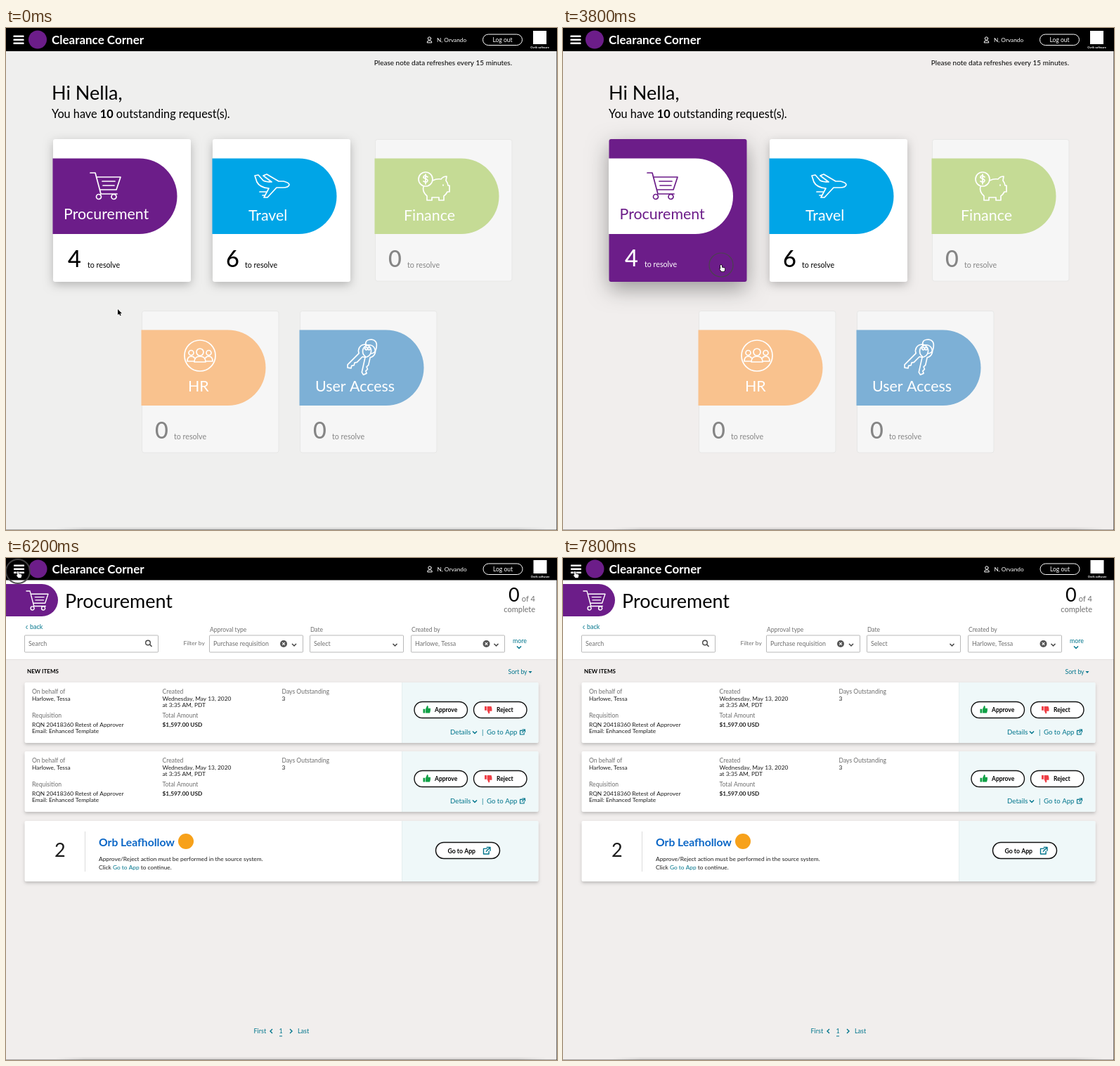
These frames come from a looping animation (784 px wide and 714 px high, 8000 ms). An HTML page with a canvas:

```html
<!DOCTYPE html>
<html lang="en">
<head>
<meta charset="utf-8">
<title>Approvals demo</title>
<style>
html, body { margin: 0; width: 100%; height: 100%; overflow: hidden; background: #f1eeed; }
canvas { display: block; width: 784px; height: 714px; }
</style>
</head>
<body>
<canvas id="stage"></canvas>
<script>
const W = 784, H = 714, LOOP = 8000, STEP = 200;
const PURPLE = '#6c1d89', BLUE = '#00a5e7', TEAL = '#00758c', GREY = '#6f6f6f', INK = '#1c1c1c', PAPER = '#f1eeed';
const canvas = document.getElementById('stage');
const ctx = canvas.getContext('2d');
const dpr = window.devicePixelRatio || 1;
canvas.width = W * dpr;
canvas.height = H * dpr;

const clamp = v => Math.max(0, Math.min(1, v));
const smooth = v => { v = clamp(v); return v * v * (3 - 2 * v); };
const mix = (a, b, p) => a + (b - a) * p;

// Line icons in a box of about 48 units
const ICONS = {
  cart: 'M0 2H7L15 32H38M8.5 8H43L37 26H13.5M17 14H35M18 20H34M15.5 36a3.5 3.5 0 1 1-7 0a3.5 3.5 0 1 1 7 0M37 36a3.5 3.5 0 1 1-7 0a3.5 3.5 0 1 1 7 0',
  plane: 'M1 3L6 2L13 10Q17 12 25 12L13 3L18 1L35 11H42Q50 13 50 16Q49 20 41 20H32L19 34H14L21 21Q8 20 4 12ZM8 26H17M12 31H15',
  pig: 'M20 10a10 10 0 1 1-20 0a10 10 0 1 1 20 0M20 12Q26 9 32 10Q35 6 40 6L39 12Q42 16 42 19H44V28H41Q39 32 36 34V40H29V36H19V40H12V34Q5 28 7 20M35 18v1M13 7Q7 3 7 8Q13 10 13 12Q12 16 7 13M10 3V17',
  people: 'M44 22a22 22 0 1 1-44 0a22 22 0 1 1 44 0M27 17a5 5 0 1 1-10 0a5 5 0 1 1 10 0M14 31Q14 23 22 23Q30 23 30 31ZM13 18a3.5 3.5 0 1 1-7 0a3.5 3.5 0 1 1 7 0M38 18a3.5 3.5 0 1 1-7 0a3.5 3.5 0 1 1 7 0M4 30Q4 23 9.5 23Q13 23 14 25M14 30H4M40 30Q40 23 34.5 23Q31 23 30 25M30 30H40',
  keyHead: 'M-3 8V31L0 34L4 31L2 28L4 25L2 22L4 19V8A9 9 0 1 0-3 8ZM1.5-4a1.8 1.8 0 1 1-3.6 0a1.8 1.8 0 1 1 3.6 0',
  keyRing: 'M25 9Q23 0 33 0Q42 1 40 12Q39 19 33 20',
  external: 'M5 2H0V10H8V6M5 0H10V5M10 0L4 6',
  user: 'M5.5 2.5a2.2 2.2 0 1 1-4.4 0a2.2 2.2 0 1 1 4.4 0M0 8Q0 5.5 2 5.5H4.6Q6.6 5.5 6.6 8Z'
};
const THUMB = new Path2D('M0 5H3V11H0ZM3.8 5L6 0Q8.3 0 7.5 4H11Q11.5 8 10 11H3.8Z');
const ARROW = new Path2D('M0 0V9.5L2.3 7.6L3.9 11L5.5 10.2L4 7H7Z');
const HAND = new Path2D('M2 0Q3.5 0 3.5 1.5V4L8 5Q9 5.5 8.5 8L7.5 11H3L0 7Q0 5.5 1.5 6.5L1 1.5Q1 0 2 0Z');
for (const k in ICONS) ICONS[k] = new Path2D(ICONS[k]);

function text(s, x, y, size, color = INK, weight = 400, align = 'left') {
  ctx.font = `${weight} ${size}px Lato, sans-serif`;
  ctx.fillStyle = color;
  ctx.textAlign = align;
  ctx.fillText(s, x, y);
  return x + ctx.measureText(s).width;
}
function rect(x, y, w, h, color) {
  ctx.fillStyle = color;
  ctx.fillRect(x, y, w, h);
}
function round(x, y, w, h, r, fill, stroke, lw = 1) {
  ctx.beginPath();
  ctx.roundRect(x, y, w, h, r);
  if (fill) { ctx.fillStyle = fill; ctx.fill(); }
  if (stroke) { ctx.strokeStyle = stroke; ctx.lineWidth = lw; ctx.stroke(); }
}
function disc(x, y, r, color) {
  ctx.beginPath();
  ctx.arc(x, y, r, 0, 7);
  ctx.fillStyle = color;
  ctx.fill();
}
function line(color, lw, ...pts) {
  ctx.beginPath();
  for (let i = 0; i < pts.length; i += 2) ctx.lineTo(pts[i], pts[i + 1]);
  ctx.strokeStyle = color;
  ctx.lineWidth = lw;
  ctx.stroke();
}
function shadowed(blur, dy, alpha, draw) {
  ctx.save();
  ctx.shadowColor = `rgba(0,0,0,${alpha})`;
  ctx.shadowBlur = blur * dpr;
  ctx.shadowOffsetY = dy * dpr;
  draw();
  ctx.restore();
}
function shape(path, x, y, scale, color, lw, angle = 0) {
  ctx.save();
  ctx.translate(x, y);
  ctx.rotate(angle);
  ctx.scale(scale, scale);
  ctx.lineJoin = ctx.lineCap = 'round';
  ctx.strokeStyle = color;
  ctx.lineWidth = lw / scale;
  ctx.stroke(path);
  ctx.restore();
}
function icon(name, x, y, scale, color, lw) {
  if (name !== 'keys') return shape(ICONS[name], x, y, scale, color, lw);
  shape(ICONS.keyRing, x, y, scale, color, lw);
  shape(ICONS.keyHead, x + 23 * scale, y + 16 * scale, scale, color, lw, 0.78);
  shape(ICONS.keyHead, x + 29 * scale, y + 17 * scale, scale, color, lw, 0.22);
}
const chevron = (x, y, color, s = 3) => line(color, 1.5, x - s, y - s / 2, x, y + s / 2, x + s, y - s / 2);
const arrowhead = (x, y, dir) => line(TEAL, 1.4, x - dir * 1.5, y - 3, x + dir * 1.5, y, x - dir * 1.5, y + 3);

const CARDS = [
  { x: 67, y: 158, color: PURPLE, label: 'Procurement', lx: 15, ly: 114, n: 4, icon: 'cart', ix: 53, iy: 46, on: true },
  { x: 294, y: 158, color: BLUE, label: 'Travel', lx: 51, ly: 116, n: 6, icon: 'plane', ix: 59, iy: 49, on: true },
  { x: 525, y: 158, color: '#c5db95', label: 'Finance', lx: 41, ly: 116, n: 0, icon: 'pig', ix: 62, iy: 47 },
  { x: 193, y: 402, color: '#f9c28e', label: 'HR', lx: 66, ly: 115, n: 0, icon: 'people', ix: 61, iy: 42 },
  { x: 418, y: 402, color: '#7db0d6', label: 'User Access', lx: 22, ly: 115, n: 0, icon: 'keys', ix: 69, iy: 41 }
];

function card(c, hover) {
  const x = hover ? c.x - 1.5 : c.x, y = c.y;
  const face = hover ? c.color : c.on ? '#fff' : '#f6f6f6';
  if (hover) shadowed(30, 10, 0.36, () => round(x, y, 196, 203, 3, face));
  else if (c.on) shadowed(14, 4, 0.25, () => round(x, y, 196, 203, 3, face));
  else round(x + 0.5, y + 0.5, 194.5, 201.5, 3, face, '#e7e7e6');
  round(x - 0.5, y + 27.5, 177, 107.5, [0, 54, 54, 0], hover ? '#fff' : c.color);
  const mark = hover ? c.color : '#fff';
  icon(c.icon, c.x + c.ix, y + c.iy, 1, mark, 1.7);
  text(c.label, x + c.lx, y + c.ly, 21.4, mark);
  const ink = hover ? '#fff' : c.on ? '#000' : '#858585';
  const first = c.n === 4 ? 2 : 0, dy = hover ? -1 : 0;
  text(c.n, c.x + 19 + first, y + 182 + dy, 32.5, ink, 500);
  text('to resolve', c.x + 46 + first * 1.5, y + 183 + dy, 10.7, ink);
}

function header(dx, dy, h) {
  rect(0, 0, W, h, '#000');
  ctx.save();
  ctx.translate(dx, dy);
  for (let i = 0; i < 3; i++) round(10.5, 10.5 + i * 5, 15, 2.6, 0.5, '#fff');
  disc(45, 16.5, 13, PURPLE);
  text('Clearance Corner', 65, 22.5, 17, '#fff', 700);
  icon('user', 599.2, 12.5, 1, '#fff', 1);
  text('N, Orvando', 613, 20, 8.3, '#fff');
  round(678.5, 9, 56, 15.5, 8, null, '#fff', 1);
  text('Log out', 706.5, 20, 8.5, '#fff', 400, 'center');
  rect(750, 4, 19, 19, '#fff');
  text('Ovrik software', 759.5, 28.5, 4, '#fff', 700, 'center');
  ctx.restore();
}

function home(t) {
  const p = clamp(t / 1600);
  rect(0, 0, W, H, `rgb(${mix(239, 241, p)},${mix(239, 238, p)},${mix(238, 237, p)})`);
  header(0, 0, 33);
  text('Please note data refreshes every 15 minutes.', 720, 53, 10, '#000', 400, 'right');
  text('Hi Nella,', 65, 102, 27, '#000');
  let x = text('You have ', 65, 128, 16.3, '#000');
  x = text('10', x, 128, 16.3, '#000', 700);
  text(' outstanding request(s).', x, 128, 16.3, '#000');
  CARDS.forEach((c, i) => card(c, i === 0 && t >= 2200));
}

function field(x, w, value) {
  round(x + 0.5, 110, w - 1, 24, 1, '#fff', '#b9b9b9');
  text(value, x + 6, 125, 8.9, GREY);
}
function clearMark(x) {
  disc(x, 122, 5, '#555');
  line('#fff', 1.2, x - 1.8, 120.2, x + 1.8, 123.8);
  line('#fff', 1.2, x + 1.8, 120.2, x - 1.8, 123.8);
}
function thumb(x, y, color, flip) {
  ctx.save();
  ctx.translate(x, y);
  ctx.scale(0.95, 0.95 * flip);
  ctx.fillStyle = color;
  ctx.fill(THUMB);
  ctx.restore();
}
function panel(y) {
  shadowed(4, 2.5, 0.2, () => round(26.5, y, 731, 86, 2, '#fff'));
  round(564, y, 193.5, 86, [0, 2, 2, 0], '#eff8f9');
  line('#e4eeef', 1, 563.5, y, 563.5, y + 86);
}
function request(y) {
  panel(y);
  const pair = (label, x, dy, lines, weight) => {
    text(label, x, y + dy, 8.6, GREY);
    lines.forEach((s, i) => text(s, x, y + dy + 10 + i * 9.2 + (dy > 20 ? 2.5 : 0), 8.35, INK, weight));
  };
  pair('On behalf of', 37, 16, ['Harlowe, Tessa']);
  pair('Requisition', 37, 50, ['RQN 20418360 Retest of Approver', 'Email: Enhanced Template']);
  pair('Created', 222.5, 16, ['Wednesday, May 13, 2020', 'at 3:35 AM, PDT']);
  pair('Total Amount', 222.5, 50, ['$1,597.00 USD'], 700);
  pair('Days Outstanding', 392.5, 16, ['3']);
  round(581, y + 27.5, 75.5, 23, 11.5, '#fff', '#111', 1.4);
  thumb(593.5, y + 33, '#10a045', 1);
  text('Approve', 610, y + 42, 8.5, '#000', 700);
  round(665.5, y + 27.5, 75.5, 23, 11.5, '#fff', '#111', 1.4);
  thumb(681, y + 44.5, '#ef3e45', -1);
  text('Reject', 698, y + 42, 8.5, '#000', 700);
  text('Details', 632, y + 74, 9.7, TEAL);
  chevron(667, y + 71, TEAL);
  text('|', 677, y + 74, 9.5, TEAL);
  text('Go to App', 684, y + 74, 9.6, TEAL);
  icon('external', 731.5, y + 67, 0.7, TEAL, 1.1);
}

function list() {
  rect(0, 0, W, H, PAPER);
  rect(0, 0, W, 144, '#fff');
  rect(0, 144, W, 1, '#e3e0df');
  round(-4, 37, 78, 46, [0, 23, 23, 0], PURPLE);
  icon('cart', 29, 45.5, 0.72, '#fff', 1.4);
  text('Procurement', 84, 70.5, 27, '#000');
  text('0', 715, 62, 27, '#000');
  text('of 4', 753, 62, 11, GREY, 400, 'right');
  text('complete', 753, 76.5, 11, GREY, 400, 'right');
  line(TEAL, 1, 30.5, 96, 28.5, 98.5, 30.5, 101);
  text('back', 34, 101, 9, TEAL);
  field(26, 191, 'Search');
  ctx.beginPath();
  ctx.arc(202, 120.5, 3.3, 0, 7);
  ctx.strokeStyle = '#444';
  ctx.lineWidth = 1.4;
  ctx.stroke();
  line('#444', 1.6, 204.5, 123, 207.5, 126);
  text('Filter by', 252.5, 124, 8.4, GREY);
  [['Approval type', 289], ['Date', 432], ['Created by', 576]].forEach(([s, x]) => text(s, x + 1, 105, 8.5, GREY));
  field(289, 134, 'Purchase requisition');
  field(432, 134, 'Select');
  field(576, 134, 'Harlowe, Tessa');
  [410, 553.5, 697.5].forEach(x => chevron(x, 123.5, '#444'));
  clearMark(395);
  clearMark(683.5);
  text('more', 721, 121, 8.8, TEAL);
  chevron(730, 127, TEAL);
  text('NEW ITEMS', 30, 164, 8, '#000', 700);
  text('Sort by', 714.5, 165, 8.6, TEAL);
  ctx.beginPath();
  ctx.moveTo(743.5, 161);
  ctx.lineTo(748.5, 161);
  ctx.lineTo(746, 164);
  ctx.fill();
  request(177);
  request(275);

  panel(374);
  text('2', 69, 425, 27, INK);
  line('#dcdcdc', 1, 112.5, 389, 112.5, 446);
  text('Orb Leafhollow', 132, 410, 15.7, '#0a66c6', 700);
  disc(256, 403, 11, '#f7a11a');
  text('Approve/Reject action must be performed in the source system.', 132, 431, 8.35);
  let x = text('Click ', 132, 443, 8.35);
  x = text('Go to App', x, 443, 8.35, TEAL);
  text(' to continue.', x, 443, 8.35);
  round(611.5, 404.5, 91, 23, 11.5, '#fff', '#111', 1.5);
  text('Go to App', 628.5, 419.5, 8.7, '#000', 700);
  icon('external', 679.5, 411.5, 0.95, TEAL, 1.4);

  text('First', 352.5, 676, 9, TEAL);
  arrowhead(377.5, 673, -1);
  text('1', 391, 676, 9, TEAL, 400, 'center');
  rect(389, 679.5, 4, 1, TEAL);
  arrowhead(405.5, 673, 1);
  text('Last', 415, 676, 9, TEAL);
}

const MENU = [
  { y: 81.5, h: 47, bg: PURPLE, ink: '#fff', label: 'Procurement', n: 4, badge: '#fff', nInk: PURPLE, icon: 'cart', line: '#fff', iy: 95 },
  { y: 128.5, h: 46.5, bg: '#fff', ink: '#000', label: 'Travel', n: 6, badge: BLUE, nInk: '#fff', icon: 'plane', line: BLUE, iy: 144 },
  { y: 175, h: 45, label: 'Finance', icon: 'pig', iy: 187 },
  { y: 220, h: 46, label: 'HR', icon: 'people', iy: 235 },
  { y: 266, h: 45, label: 'User Access', icon: 'keys', iy: 278 }
];

function menu(p) {
  ctx.save();
  ctx.translate(-150 * (1 - p), 0);
  rect(0, 31, 150, H, '#f2efee');
  disc(20, 61, 9.5, PURPLE);
  text('Home', 39, 67, 10.8, '#000');
  for (const m of MENU) {
    const mid = m.y + m.h / 2;
    rect(0, m.y, 150, m.h, m.bg || '#f9f8f7');
    if (!m.badge) rect(0, m.y + m.h - 1, 150, 1, '#efedec');
    icon(m.icon, 9, m.iy, 0.47, m.line || '#b0b0b0', 1.1);
    text(m.label, 39, mid + (m.label === 'HR' ? 2.5 : 3.5), 10.8, m.ink || '#a9a9a9');
    if (m.badge) disc(131, mid + 0.8, 11, m.badge);
    text(m.n || 0, 131, mid + 4.5, m.badge ? 10.5 : 11, m.nInk || '#a9a9a9', m.badge ? 700 : 400, 'center');
  }
  ctx.restore();
}

// Pointer path: time, x, y
const PATH = [[200, 159, 400], [1400, 149, 390], [1800, 149, 390], [2200, 165, 357], [3200, 225, 337], [4600, 225, 337], [5800, 17, 19]];
const CLICKS = [1650, 3525, 5925, 7125];

function pointerAt(t) {
  const i = PATH.findIndex(k => k[0] > t);
  if (i === 0) return PATH[0].slice(1);
  if (i < 0) return PATH[PATH.length - 1].slice(1);
  const a = PATH[i - 1], b = PATH[i], p = smooth((t - a[0]) / (b[0] - a[0]));
  return [mix(a[1], b[1], p), mix(a[2], b[2], p)];
}
function pointer(t) {
  const [x, y] = pointerAt(t);
  const hand = (t >= 2200 && t < 4000) || t >= 5800;
  for (const start of CLICKS) {
    const age = t - start;
    if (age < 0 || age > 300) continue;
    const r = 6 + age * 0.04;
    ctx.beginPath();
    ctx.arc(x, y, r, 0, 7);
    ctx.strokeStyle = r < 15 ? '#151515' : 'rgba(72,72,72,.9)';
    ctx.lineWidth = t > 5000 ? 2 : 1.2;
    ctx.stroke();
  }
  ctx.save();
  ctx.translate(hand ? x - 2 : x, y);
  ctx.lineJoin = 'round';
  ctx.scale(0.85, 0.85);
  ctx.strokeStyle = hand ? '#000' : '#fff';
  ctx.fillStyle = hand ? '#fff' : '#000';
  ctx.lineWidth = 1.6;
  const path = hand ? HAND : ARROW;
  ctx.stroke(path);
  ctx.fill(path);
  ctx.restore();
}

function edges() {
  const g = ctx.createLinearGradient(70, 0, 770, 0);
  g.addColorStop(0, 'rgba(0,0,0,0)');
  g.addColorStop(0.06, 'rgba(0,0,0,.06)');
  g.addColorStop(0.94, 'rgba(0,0,0,.06)');
  g.addColorStop(1, 'rgba(0,0,0,0)');
  rect(70, 710, 700, 4, g);
  rect(70, 712, 700, 2, g);
  rect(0, 713, W, 1, 'rgba(0,0,0,.3)');
  rect(783, 0, 1, H, 'rgba(0,0,0,.5)');
}

function draw(t) {
  ctx.setTransform(dpr, 0, 0, dpr, 0, 0);
  if (t < 4000) home(t);
  else {
    const open = smooth((t - 6200) / 400) * (1 - smooth((t - 7400) / 400));
    ctx.save();
    ctx.translate(-0.7 * open, -0.5 * open);
    list();
    ctx.restore();
    if (open > 0) {
      rect(0, 0, W, H, `rgba(0,0,0,${0.56 * open})`);
      menu(open);
    }
    header(0.5 - 0.5 * open, -1, 31.5);
  }
  edges();
  pointer(t);
}

const begin = performance.now();
function tick() {
  const t = (performance.now() - begin) % LOOP;
  draw(Math.floor(t / STEP) * STEP);
  requestAnimationFrame(tick);
}
tick();
</script>
</body>
</html>
```
